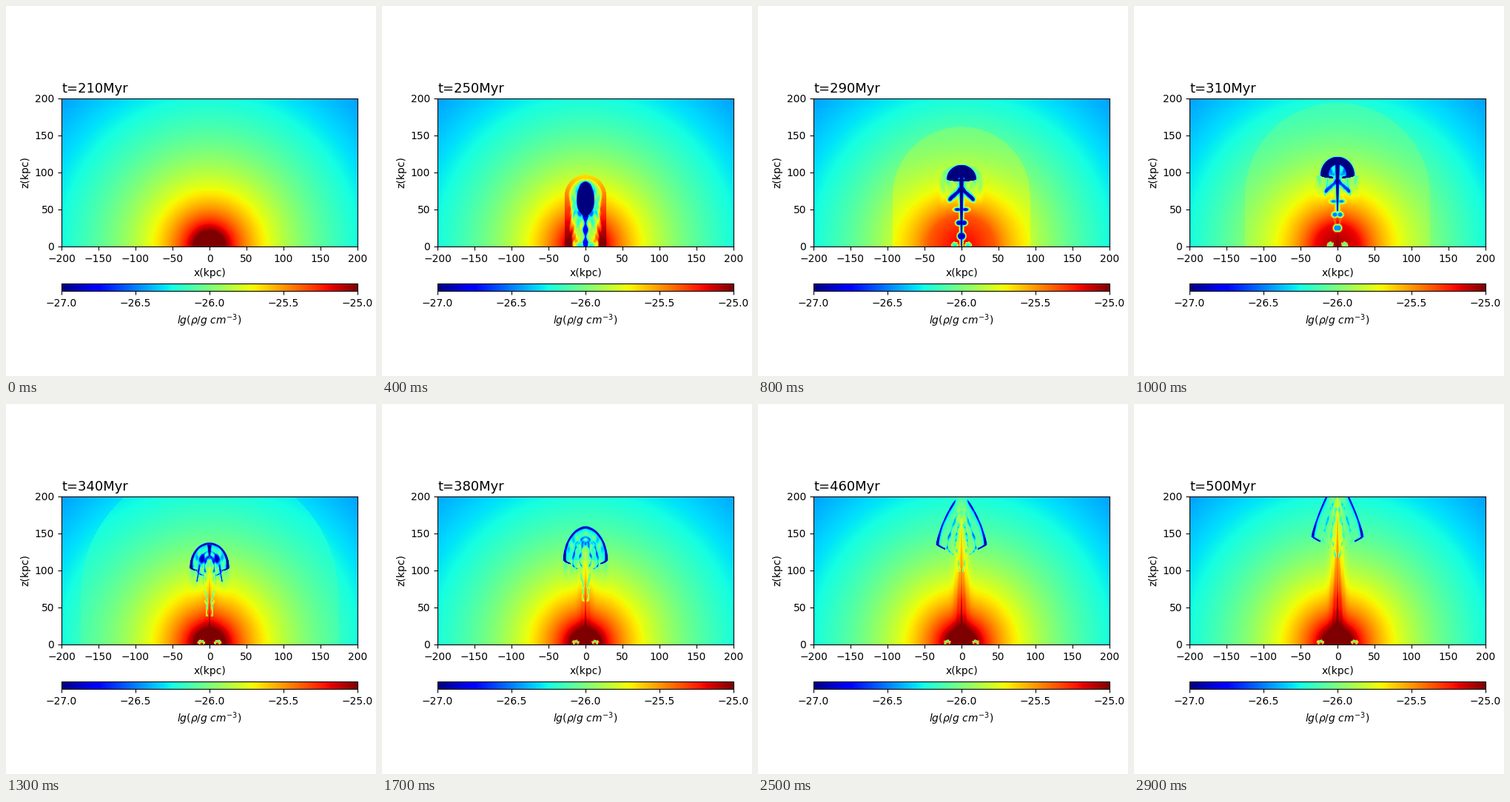
A matplotlib script that plays this animation: 500 px wide and 500 px high, repeating every 3000 ms.

```python
import numpy as np
import matplotlib.pyplot as plt
from matplotlib.animation import FuncAnimation

FRAMES, INTERVAL = 30, 100
START, STEP = 210, 10  # Myr
plt.rcParams["font.family"] = "DejaVu Sans"

# Mirrored grid, one cell per kpc
X, Z = np.meshgrid(np.abs(np.arange(-199.5, 200)), np.arange(0.5, 200))
R = np.hypot(X, Z)
ATMOSPHERE = -26.0 - 1.27 * np.log10(R / 129)


def ease(s, start, end):
    u = np.clip((s - start) / (end - start), 0, 1)
    return u * u * (3 - 2 * u)


def soft(d, width=1.0):
    """Coverage of a shape from its signed distance (negative inside)."""
    return np.clip(0.5 - d / width, 0, 1)


def mix(field, value, mask):
    return field + (value - field) * mask


def carve(field, value, mask):
    """Lower the density only, so that darker parts stay on top."""
    return np.minimum(field, mix(field, value, mask))


def ellipse(cx, cz, rx, rz):
    return (np.hypot((X - cx) / rx, (Z - cz) / rz) - 1) * min(rx, rz)


def stroke(x0, z0, x1, z1, width):
    dx, dz = x1 - x0, z1 - z0
    u = np.clip(((X - x0) * dx + (Z - z0) * dz) / (dx * dx + dz * dz), 0, 1)
    return np.hypot(X - x0 - u * dx, Z - z0 - u * dz) - width


def swirl(s, top, phase=0.0, kx=0.55, kz=0.2):
    """Smooth turbulence that travels with the lobe."""
    y = Z - top
    a = np.sin(kx * X + 2 * np.sin(0.13 * y + phase) + 0.02 * s)
    b = np.sin(kz * y + 1.6 * np.sin(0.33 * X + phase))
    return 0.6 * a * (1 + b) + 0.2 * np.sin(0.9 * X + 0.5 * y + phase)


def capsule(radius, centre):
    return np.hypot(X, np.maximum(Z - centre, 0)) - radius


def add_shock(f, s, radius, centre):
    d = capsule(radius, centre)
    f = f + 0.2 * np.exp(-(s - 40) / 55 + d / 60) * (d < 0) * min(s / 40, 1)
    if s > 40:
        peak = -25.15 + 0.005 * abs(s - 80)
        f = np.where(d < 0, np.minimum(f, peak - 0.005 * R), f)
    return f


def add_cocoon(f, s, top, radius, centre):
    """Swept-up shell around a hot, ragged cavity."""
    size = min(s / 40, 1)
    height = Z / size
    weight = soft(capsule(radius, centre)) * (1 - ease(s, 40, 75))
    f = mix(f, -24.95 - 0.0073 * height, weight)
    half = np.minimum(radius - (13 - 0.07 * height) * size, 20)
    d = capsule(half, centre) + 2 * swirl(s, top, 1) * (height < 55)
    hot = -26.15 + 0.2 * swirl(s, top) + 0.3 * soft(height - 32, 25)
    return mix(f, hot, soft(d, 7) * weight)


def add_column(f, s, top):
    """Gas lifted along the axis behind the lobe."""
    growth = np.clip((s - 90) / 200, 0, 1)
    lift = 0.36 * growth * np.exp(-(X / 9) ** 2) * np.clip(Z / 60, 0, 1)
    lift = lift * (1 + 0.15 * np.sin(1.1 * X + 0.05 * Z))
    axis = 0.1 * ease(s, 80, 130) * (X < 1)
    f = f + (lift + axis) * soft(Z - top + 12, 30)

    # Ragged cool filaments left in the wake
    low = 38 + 0.5 * (s - 130)
    length = 60 * np.exp(-(s - 130) / 90)
    climb = Z - low
    gate = (climb > 0) & (climb < length)
    for slope, phase in ((0.03, 0), (0.11, 2)):
        path = 3 + slope * climb + 0.8 * np.sin(0.3 * Z + phase)
        broken = np.clip(0.5 + swirl(s, top, 2 + phase, 0.2, 0.4), 0, 1)
        f = carve(f, -26.3, soft(np.abs(X - path) - 0.7, 1.6)
                  * gate * broken * ease(s, 90, 130))
    return f


def add_lobe(f, s, top):
    young = 1 - ease(s, 40, 80)
    late = ease(s, 80, 125)
    height = mix(19 + 0.29 * max(s - 80, 0), 0.3 * top, young)
    low = mix(3 + 0.06 * max(s - 80, 0), 0.23 * top, young)
    rx = 38 * (1 - np.exp(-s / 108))
    power = 2 - 0.8 * ease(s, 130, 290)
    zc = top - height
    noise = swirl(s, top)

    def arch(scale, drop, width):
        c = zc - drop
        rz = np.where(Z > c, height * (0.5 + 0.5 * scale) + drop / 2, low)
        e = ((X / (rx * scale)) ** power
             + (np.abs(Z - c) / rz) ** power) ** (1 / power)
        d = (e - 1) * rx * scale
        return d, np.maximum(d, -d - width)

    outer, rim = arch(1, 0, mix(16, 3.4, late)
                      * (1 - late + late * (0.5 + 0.7 * soft(Z - zc - 8, 30))))

    # Haze below the cap, trailing downwards
    span = rx * (1.4 - 0.4 * late)
    lid = Z - zc - height * np.sqrt(np.clip(1 - (X / span) ** 2, 0, 1))
    lid = np.maximum(lid, late * outer * (Z > zc))
    trail = np.exp(-(np.minimum(Z - zc, 0) / 22) ** 2)
    alpha = 0.8 * ease(s, 40, 80) * (1 - ease(s, 130, 260))
    hollow = 1 - 0.6 * late * np.exp(-(X / 7) ** 2)
    f = mix(f, -26.28 + 0.24 * noise,
            soft(X - span, 6) * soft(lid, 3) * trail * alpha * hollow)

    # Broken inner arches
    strength = ease(s, 85, 130) * (1 - 0.5 * ease(s, 200, 290))
    for scale, phase in ((0.6, 0.5), (0.28, 2.4)):
        d = arch(scale, 10 * scale, 2)[1] + 0.8 * np.sin(0.35 * (Z - top))
        cut = np.clip(0.55 + swirl(s, top, phase, 0.25, 0.32), 0, 1)
        gate = X > 0.5 * scale * rx * (Z < zc)
        f = carve(f, -26.8, soft(d, 1.8) * cut * gate * strength)
    rolls = late * (1 - ease(s, 130, 165))
    f = carve(f, -26.9, soft(ellipse(10, top - 22, 3.5, 6), 3) * rolls)
    f = carve(f, -26.7, soft(stroke(13, top - 30, 17, top - 52, 0.8)) * rolls)

    # Main cap, curling inwards at its edge and opening at the top
    gate = np.clip((X + 3 - (s - 170) / 8) / 3, 0, 1)
    gate = gate * np.where(Z < zc, X > 0.65 * rx * late, 1)
    f = carve(f, -26.4, soft(rim - 2, 4) * (outer < 0) * gate * 0.7 * late)
    shade = -27.1 + late * (0.25 * np.clip(noise, 0, 1) + 0.001 * (s - 130))
    return carve(f, shade, soft(rim, 1.6) * gate)


def add_jet(f, s, top):
    young = 1 - ease(s, 40, 80)
    base = 2.4 * (s - 80)
    taper = np.clip((Z - base) / (top - base + 1), 0, 1)
    half = mix(0.8 + 2.2 * taper, 2.3 + 1.3 * np.sin(0.35 * Z), young)
    d = np.maximum(X - half, np.maximum(Z - top + 3, base - Z))
    f = carve(f, -26.4, soft(d - 1.5, 3) * 0.7)
    f = carve(f, -27.0 + 0.25 * young * (Z < 0.45 * top), soft(d, 1.5))

    # Wings at the waist of the young lobe
    d = ellipse(8, top * 0.51, 4, 5) + swirl(s, top, 0.7)
    f = carve(f, -26.55, soft(d, 3) * young)

    # Skirt and knots shed along the fading stem
    shed = ease(s, 50, 75) * (1 - ease(s, 85, 120))
    up = top - 110
    d = stroke(2, 77 + up, 15, 64 + up, 2) + 0.5 * swirl(s, top)
    f = carve(f, -26.4, soft(d - 2, 4) * shed)
    f = carve(f, -26.95, soft(d, 2) * shed)
    for k in range(3):
        d = ellipse(1.5 + 2 * k, 14 + 18 * k + up, 3.5, 4 - k)
        f = carve(f, -26.3, soft(d - 1, 3) * shed)
        f = carve(f, -26.85, soft(d, 2) * shed)
    return f


def add_eddy(f, s):
    """Small vortex creeping outwards along the floor."""
    cx = 8 + 15 * (s / 290) ** 2
    shown = ease(s, 20, 40)
    d = ellipse(cx, 2.5, 4.5, 3.6) + 0.5 * np.sin(1.3 * X + Z + 0.05 * s)
    f = mix(f, -26.05, soft(d, 1.6) * shown)
    core = soft(ellipse(cx - 0.5, 1.2, 2.5, 1.6), 1.4)
    return mix(f, -26.3 + 1.1 * ease(s, 80, 130), core * shown)


def density(s):
    """Log density, s Myr after the jet is switched on."""
    if s == 0:
        return ATMOSPHERE
    top = min(2.2 * s, 66 + 0.55 * s)
    radius = max(0.7 * s, 1.62 * s - 37)
    centre = min(1.72 * s, 69)
    f = add_shock(ATMOSPHERE, s, radius, centre)
    f = add_cocoon(f, s, top, radius, centre)
    f = add_column(f, s, top)
    f = add_lobe(f, s, top)
    f = add_jet(f, s, top)
    return add_eddy(f, s)


fig, ax = plt.subplots(figsize=(5, 5), dpi=100)
fig.subplots_adjust(left=0.15, right=0.95, bottom=0.15, top=0.95)
image = ax.imshow(ATMOSPHERE, origin="lower", extent=(-200, 200, 0, 200),
                  cmap="jet", vmin=-27, vmax=-25, interpolation="nearest")
ax.set_xticks(range(-200, 201, 50))
ax.set_yticks(range(0, 201, 50))
ax.set_xlabel("x(kpc)")
ax.set_ylabel("z(kpc)")
title = ax.set_title("", loc="left", fontsize=13)

bar = fig.colorbar(image, cax=fig.add_axes([0.15, 0.23, 0.8, 0.02]),
                   orientation="horizontal",
                   ticks=np.arange(-27, -24.9, 0.5))
bar.set_label(r"$lg(\rho/g\ cm^{-3})$")


def update(i):
    image.set_data(density(STEP * i))
    title.set_text(f"t={START + STEP * i}Myr")
    return image, title


anim = FuncAnimation(fig, update, frames=FRAMES, interval=INTERVAL,
                     repeat=True, repeat_delay=0)
plt.show()
```
